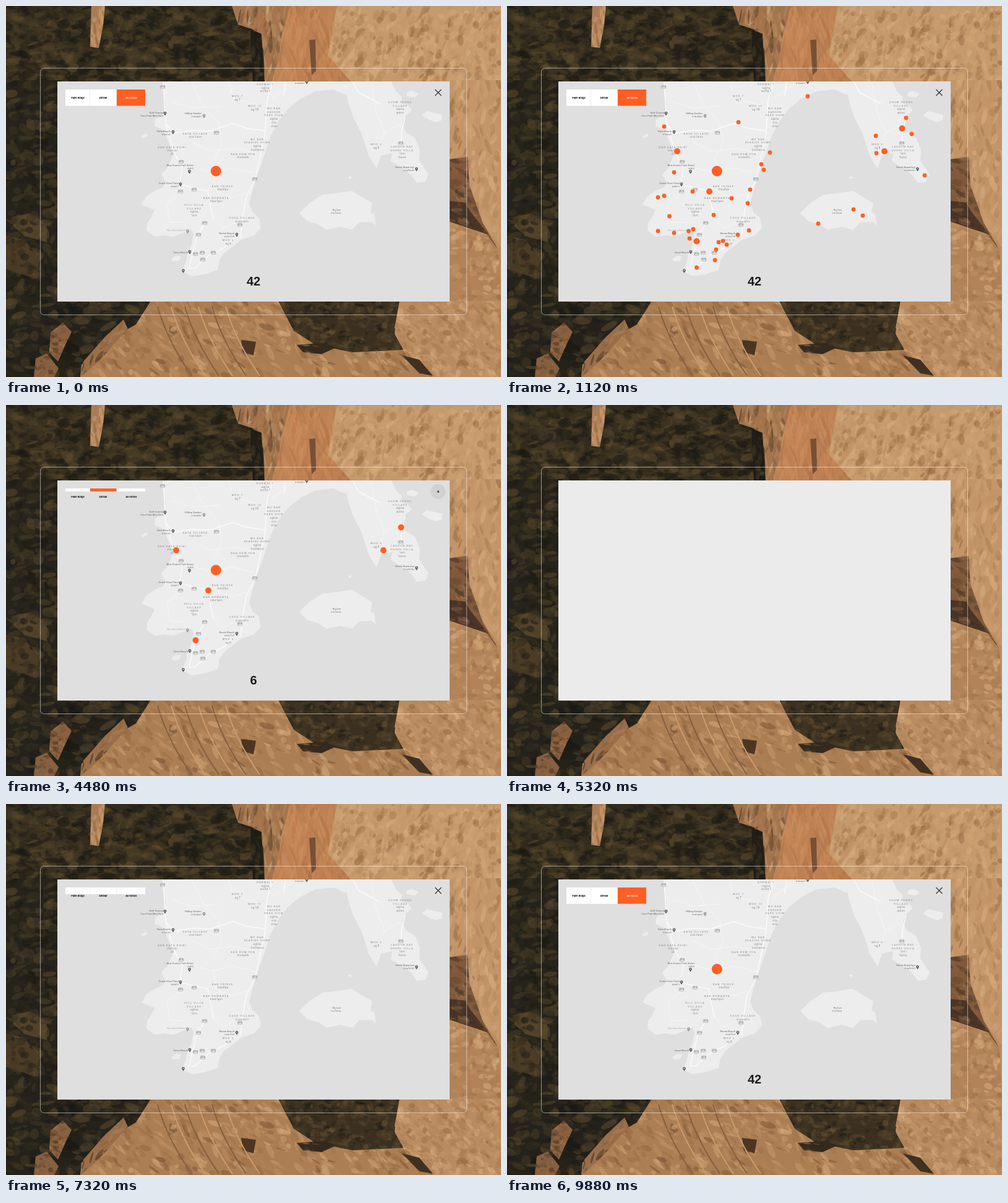
These frames come from a looping animation (800x600 px, 9.92 s). An HTML page with a canvas:

```html
<!DOCTYPE html>
<html lang="en">
<head>
<meta charset="utf-8">
<title>Hotel map</title>
<style>
html, body { margin: 0; width: 100%; height: 100%; overflow: hidden; background: #2b271d; }
canvas, svg { position: absolute; left: 0; top: 0; width: 800px; height: 600px; }
svg { will-change: transform; }
text { font-family: Roboto, "Noto Sans", sans-serif; font-size: 4.3px; }
.area { fill: #8b8b8b; letter-spacing: 1.05px; text-anchor: middle; }
.thai { fill: #858585; letter-spacing: 0; font-size: 5px; }
.spot { fill: #686868; text-anchor: end; }
.tab { font: bold 4px Inter, "Liberation Sans", sans-serif; text-anchor: middle; }
.count { font: bold 20px "Liberation Sans", Arial, sans-serif; text-anchor: middle; fill: #1c1c1c; }
</style>
</head>
<body>
<canvas id="cliff" width="800" height="600"></canvas>
<svg id="stage" viewBox="0 0 800 600">
  <defs><clipPath id="panel"><rect x="83" y="122" width="634" height="356"/></clipPath></defs>
  <rect x="83" y="122" width="634" height="356" fill="#ebebeb"/>
  <g id="map" clip-path="url(#panel)">
    <rect x="83" y="122" width="634" height="356" fill="#dfdfdf"/>
    <g fill="#ededed">
      <path d="M257 120L253 135 258 158 255 174 241 184 240 194 254 200 260 214 270 238 266 250 260 263 251 272 258 286 254 293 240 299 227 308 219 321 240 330 235 341 228 351 227 363 240 373 256 371 271 373 286 367 300 362 303 369 300 386 293 402 290 416 284 429 301 437 320 434 342 427 345 411 353 399 369 387 380 378 401 371 412 359 409 343 398 333 393 320 398 300 406 274 418 240 428 210 440 187 456 166 476 150 500 138 529 135 550 144 554 120Z"/>
      <path d="M548 120L552 152 561 180 573 203 580 222 586 242 599 263 606 242 624 238 622 251 640 262 654 272 664 286 678 284 683 272 668 250 669 233 661 213 646 204 640 190 646 177 656 169 650 161 638 157 640 147 630 138 622 120Z"/>
      <path d="M474 335L490 319 511 305 532 303 559 299 577 310 592 319 589 334 595 337 598 355 591 349 571 350 559 362 541 357 518 362 505 353 487 348Z"/>
      <path d="M647 141l8 -4 12 5 -6 6 -13 -2zM672 177l8 -7 13 3 12 3 -1 9 -10 3 -12 -5zM218 211l9 -5 2 4 -8 4zM267 409l8 -5 8 1 -3 7 -10 1zM553 277l4 -2 2 3 -4 2z"/>
    </g>
    <g id="roads" fill="none" stroke="#fafafa" stroke-linejoin="round">
      <path stroke-width="1.5" d="M254 122L258 190 270 206 300 201 330 202 366 190 390 198 420 202M432 122L422 152 419 205 403 280 388 310 382 345 379 375M258 190L272 238 285 260 281 288 299 293 326 299 330 320 335 345M322 350L308 374 301 402 296 424 305 424 328 403 352 391 374 369M645 180L639 205 638 235M452 122L449 145M560 122L570 140 604 158"/>
      <path stroke-width=".6" d="M300 122L318 160 344 190 349 222 335 250M360 122L368 150 402 158 420 165M268 155L300 165 345 162M300 220L330 235 370 230 405 238M280 255L335 270 365 262 400 270M335 270L340 300 365 310 390 302M285 300L260 320 265 350 290 350M335 345L350 360 382 345M470 122L430 150M590 125L598 170 612 205 600 235M612 205L640 190"/>
    </g>
    <g id="labels"></g>
  </g>
  <g id="dots" fill="#ff5f24"></g>
  <g id="counts"></g>
  <g id="tabs"></g>
  <g id="close">
    <circle cx="698.5" cy="140" r="12" fill="#d1d1d1"/>
    <path d="M-5 -5L5 5M5 -5L-5 5" stroke="#333" stroke-width="1.2" vector-effect="non-scaling-stroke"/>
  </g>
  <rect x="55.5" y="100.5" width="689" height="399" rx="6" fill="none" stroke="#fff" stroke-opacity=".5"/>
</svg>
<script>
const LOOP = 9920;
const $ = id => document.getElementById(id);

function add(parent, tag, attrs, text) {
  const el = document.createElementNS("http://www.w3.org/2000/svg", tag);
  for (const k in attrs) el.setAttribute(k, attrs[k]);
  if (text) el.textContent = text;
  parent.append(el);
  return el;
}

// Cliff scenery: flat shapes with seeded texture
const g = $("cliff").getContext("2d");
let seed = 11;
const rnd = () => (seed = (seed * 16807) % 2147483647) / 2147483647;

function shape(points, base, tones = [], n = 0, w = 6, h = 4, tilt = 0) {
  const p = points.split(" ").map(s => s.split(",").map(Number));
  const xs = p.map(a => a[0]), ys = p.map(a => a[1]);
  const x0 = Math.min(...xs), y0 = Math.min(...ys);
  const dx = Math.max(...xs) - x0, dy = Math.max(...ys) - y0;
  g.save();
  g.beginPath();
  p.forEach(a => g.lineTo(...a));
  g.closePath();
  g.fillStyle = base;
  g.fill();
  g.clip();
  for (let i = 0; i < n; i++) {
    g.globalAlpha = .15 + rnd() * .4;
    g.fillStyle = tones[Math.floor(rnd() * tones.length)];
    g.beginPath();
    g.ellipse(x0 + rnd() * dx, y0 + rnd() * dy, w * (.3 + rnd()), h * (.3 + rnd()), tilt + rnd() - .5, 0, 7);
    g.fill();
  }
  g.restore();
}

const leaf = ["#171712", "#4f4229", "#5f4d2e", "#1d1c17", "#423823"];
const rock = ["#d9b082", "#a87c53", "#94683f", "#cda274", "#bd9063"];
const shade = ["#58402c", "#3a2c20", "#ad8259", "#83603f"];
shape("0,0 800,0 800,600 0,600", "#b98d61");
shape("0,0 420,0 420,125 0,125", "#332c1e", leaf, 1100, 11, 6);
shape("0,120 90,120 90,600 0,600", "#26231b", leaf, 420, 10, 7);
shape("0,470 260,470 215,515 165,545 122,580 120,600 0,600", "#25221b", leaf, 260, 12, 7);
shape("138,0 160,0 157,30 150,68 136,66", "#aa7b55", rock, 50, 3, 12);
shape("365,0 460,0 445,50 436,122 418,122 416,70 400,38 375,30", "#a4744d", shade.concat(rock), 150, 3, 14);
shape("458,0 545,0 565,122 432,122 447,55", "#bd8052", ["#d28d5d", "#a66e43", "#ca9264"], 170, 3, 20);
shape("535,0 800,0 800,125 560,125 520,80", "#c59a6c", rock, 620, 5, 8, .4);
shape("715,120 800,120 800,390 765,345 747,290 744,240 715,250", "#c39568", rock, 220, 4, 12);
shape("715,248 746,244 749,290 770,350 796,395 715,340", "#80593a", shade, 130, 8, 5, .5);
shape("715,340 770,360 796,395 800,480 715,480", "#b28358", rock, 160, 7, 5);
shape("715,315 742,318 750,332 780,370 715,348", "#493426", shade, 30, 9, 3, .4);
shape("234,477 450,477 490,540 640,555 690,600 120,600 130,570 175,535 210,515", "#ac7e53", rock.concat("#755033"), 700, 10, 4, .7);
shape("440,477 636,477 628,520 642,556 560,560 500,548 465,525", "#3b3020", leaf.concat("#6b5432"), 300, 7, 5);
shape("636,477 800,477 800,600 690,600 650,570 628,530", "#b98b60", rock, 420, 8, 5, .6);
shape("120,600 125,575 160,535 190,507 197,522 170,552 150,575", "#9a6e49", shade, 60, 9, 3, -.8);
shape("72,528 92,512 106,527 95,550 84,575 70,560", "#8b6040", shade, 40, 6, 3);
shape("48,570 66,562 85,586 78,600 45,600", "#876040", shade, 25, 5, 3);
shape("0,345 38,335 65,352 66,382 30,372", "#53432a", leaf, 60, 8, 5);
shape("0,372 30,378 55,410 45,440 0,425", "#4c3b25", leaf, 60, 8, 5);
shape("380,540 404,543 400,565 383,560", "#4b3624");
shape("470,548 515,545 534,552 510,563 480,560", "#34291d", shade, 12, 8, 3);
shape("490,55 500,54 501,105 494,112", "#765037");
shape("395,38 413,45 417,122 399,122", "#211e18", leaf, 25, 4, 8);
shape("640,565 668,572 690,598 668,594", "#3f3022");
for (let i = 0; i < 6; i++) {
  const x = 245 + i * 22;
  g.strokeStyle = i % 2 ? "#c99d70" : "#83603f";
  g.lineWidth = 2;
  g.beginPath();
  g.moveTo(x, 486);
  g.quadraticCurveTo(x + 15, 540, x + 55, 598);
  g.stroke();
}

// Map labels
const labels = $("labels");
const isThai = s => /[\u0e00-\u0e7f]/.test(s);
const areas = [
  [419, 128, "DOKMAI 1|หมู่บ้าน|ดอกไม้ 1"], [374, 147, "MOO 7|หมู่ 7"],
  [402, 163, "MOO 10|หมู่ 10"], [433, 167, "MU BAN|GARDEN|PARK VIEW|หมู่บ้าน|สวน|ปาร์ค"],
  [306, 207.5, "KATA VILLAGE|กะตะวิลเลจ"], [406, 216.5, "MU BAN|SEASIDE HOME|หมู่บ้าน|บ้านริมทะเล"],
  [383, 240.5, "BAN ROM YEN|บ้านร่มเย็น"], [268.5, 229.5, "BAN KATA KHIRI|บ้านกะตะ|คีรี"],
  [350, 292.5, "BAN TRISUK|บ้านตรีสุข"], [339.5, 311.5, "BAN KHWANTA|บ้านขวัญตา"],
  [304, 323, "HILL VILLA|VILLAGE|หมู่บ้าน|วิลล่า"], [381.5, 344, "COCO VILLAGE|บ้านมะพร้าว"],
  [359, 380, "MOO 6|หมู่ 6"], [637, 157, "CHUM THONG|VILLAGE|หมู่บ้าน|ชุมทอง"],
  [598.5, 225, "MOO 8|หมู่ 8"], [640, 229, "LAGOON BAY|SHORE VILLA|วิลล่า|ริมหาด"]
];
for (const [x, y, lines] of areas)
  lines.split("|").forEach((s, i) =>
    add(labels, "text", { x, y: y + i * 5.7, class: isThai(s) ? "area thai" : "area" }, s));

const spots = [
  [254, 173.5, "Golf Course|Fern Park Mini Golf", 257, 174], [316, 174.5, "Hilltop Garden|สวนบนเขา", 320, 178],
  [266, 203.5, "Kata Beach|หาดกะตะ", 270, 204], [303, 258.5, "Blue Forest Park Safari|ซาฟารี", 296.5, 268],
  [279, 288, "Coast View Point|จุดชมวิว", 282, 288.5], [369, 369, "Rawai Beach|หาดราไวย์", 373, 370],
  [290, 364, "Nai Harn Beach", 293.5, 364.5], [294, 399.5, "Yanui Beach", 297, 398],
  [660, 261.5, "Island Aquarium|สวนสัตว์น้ำ", 663.5, 264], [541, 331, "Ko Lan|เกาะโหลน"],
  [482, 126, "หาดฉลอง", 486, 123], [0, 0, "", 286.5, 428.5]
];
for (const [x, y, lines, px, py] of spots) {
  lines.split("|").forEach((s, i) =>
    add(labels, "text", { x, y: y + i * 5, class: "spot", opacity: s.startsWith("Nai") ? .45 : 1 }, s));
  if (!px) continue;
  add(labels, "path", { d: `M${px} ${py + 3.5}l-2 -3a2.4 2.4 0 1 1 4 0z`, fill: py === 364.5 || py === 178 ? "#999" : "#626262" });
  add(labels, "circle", { cx: px, cy: py - 1, r: .8, fill: "#eee" });
}

const signs = "253,131 340,205 283,252 402,280 282,300 304,297 321,351 378,354 311,370 306,401 317,399 335,399 318,410 638,222";
for (const s of signs.split(" ")) {
  const [x, y] = s.split(",").map(Number);
  add(labels, "rect", { x: x - 3.7, y: y - 2.5, width: 7.4, height: 5, rx: .8, fill: "#f5f5f5", stroke: "#999", "stroke-width": .6 });
  add(labels, "text", { x, y: y + 1.3, "text-anchor": "middle", style: "font-size:3px", fill: "#555" }, "4028");
}

// Hotels, the small ones in the order in which they vanish
const small = ("254,195 374,188 654,207 675,274 411,256 254,307 270,367 301,361 295,376 349,380 338,394 391,363 503,352 " +
  "300,300 389,319 575,339 645,181 596,210 244,364 355,386 334,338 415,265 " +
  "486,146 425,237 597,238 270,269 393,297 363,311 244,309.5 560,329 262.5,340 293.5,364 373,370 342,382 336,411 306.5,423").split(" ");
const similar = "275,235 327,300 306.5,380.5 610,235 638.5,198".split(" ");
const dot = (s, r, on, off, span) => {
  const [cx, cy] = s.split(",");
  return { el: add($("dots"), "circle", { cx, cy }), r, on, off, span };
};
const dots = [
  ...small.map((s, i) => dot(s, 3.4, 60 + (i * 13 % 36) * 17, i < 22 ? 2240 + i * 22 : 2830 + (i - 22) * 10, 320)),
  ...similar.map((s, i) => dot(s, 5, 60 + i * 70, 4500 + i * 30, 320)),
  dot("339.3,267", 8.5, 7540, 4560, 300)
];

const counts = [["42", 9560, 2200], ["6", 2680, 4520], ["1", 7540, 9160]].map(([s, on, off]) =>
  ({ el: add($("counts"), "text", { x: 400, class: "count" }, s), on, off }));

const tabs = [["Palm Ridge", 96, 39.5, 116, 7540, 9160], ["Similar", 136, 42.5, 157, 2200, 4700],
  ["All hotels", 179, 46, 202.3, 9160, 2200]].map(([s, x, width, mid, on, off]) => ({
    white: add($("tabs"), "rect", { x, y: 135, width, fill: "#fff" }),
    hot: add($("tabs"), "rect", { x, y: 135, width, fill: "#ff5f24" }),
    text: add($("tabs"), "text", { x: mid, y: 149.5, class: "tab" }, s), on, off
  }));

const ease = (t, start, span) => {
  const p = Math.min(1, Math.max(0, (t - start) / span));
  return p < .5 ? 4 * p ** 3 : 1 - 4 * (1 - p) ** 3;
};
// 0..1 level of something switched on and off once per loop
const level = (t, on, off, span, offSpan = span) =>
  ease(t, on, span) - ease(t, off, offSpan) + (off < on ? 1 : 0);
const set = (el, attrs) => { for (const k in attrs) el.setAttribute(k, attrs[k]); };

const [disc, cross] = $("close").children;

function draw() {
  const t = performance.now() % LOOP;
  set($("map"), { opacity: level(t, 6120, 4640, 600) });

  for (const d of dots) set(d.el, { r: Math.max(0, d.r * level(t, d.on, d.off, d.span)) });

  for (const c of counts) {
    const coming = ease(t, c.on, 320), leaving = ease(t, c.off, 320);
    const rise = t >= c.on && (c.off < c.on || t < c.off) ? 4 * (1 - coming) : -4 * leaving;
    set(c.el, { opacity: level(t, c.on, c.off, 320), y: 452 + rise });
  }

  const height = 26.5 * level(t, 7120, 4320, 430, 250);
  const shown = level(t, 7120, 4480, 160);
  for (const tab of tabs) {
    const hot = level(t, tab.on, tab.off, 240);
    set(tab.white, { height });
    set(tab.hot, { height, opacity: hot });
    set(tab.text, { opacity: shown, fill: height > 13 && hot > .5 ? "#ffe6da" : "#111" });
  }

  const turn = ease(t, 4320, 160);
  const open = t < 6000;
  const scale = open ? 1 - .72 * turn : ease(t, 7080, 200);
  const gone = open ? 1 - ease(t, 4640, 400) : 1;
  set(disc, { r: open ? 12 * turn * gone : 0 });
  set(cross, { transform: `translate(698.5 140) rotate(${open ? 45 * turn : 0}) scale(${scale})`, opacity: open ? gone : scale });
  requestAnimationFrame(draw);
}
draw();
</script>
</body>
</html>
```
